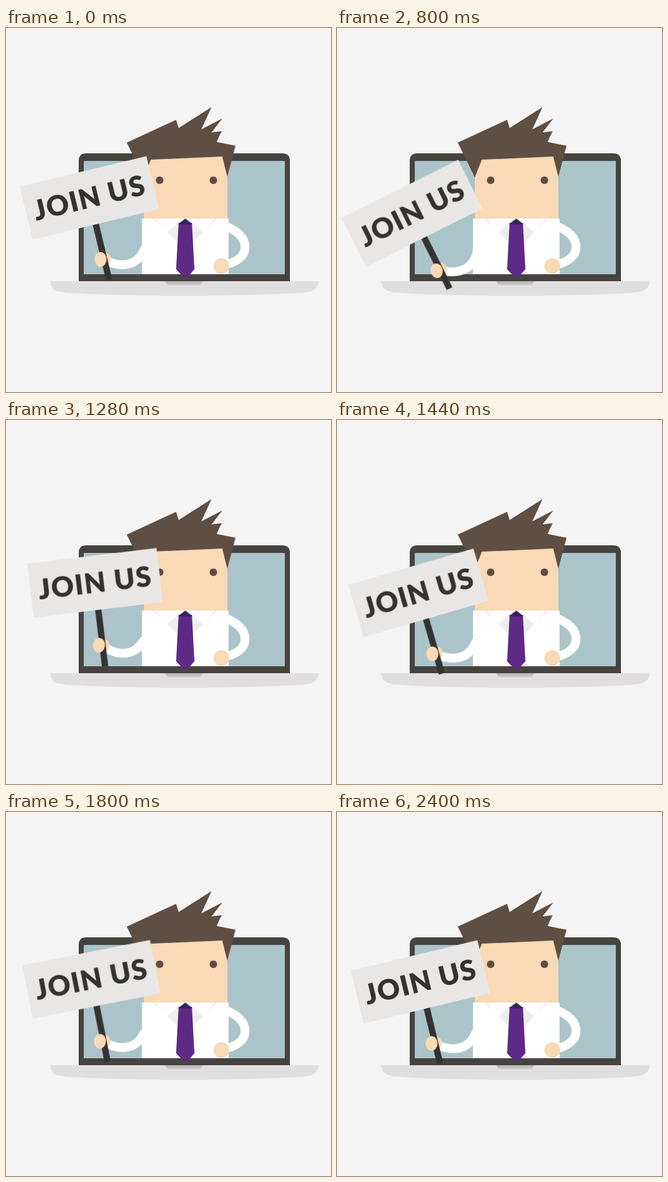
Recreate the animation shown at these times as an HTML page. Size 514 by 575 pixels, loop 3800 ms.

```html
<!DOCTYPE html>
<html lang="en">
<head>
<meta charset="utf-8">
<title>Join us</title>
<style>
  html, body { margin: 0; width: 100%; height: 100%; overflow: hidden; background: #f4f4f4; }
  svg { display: block; width: 100%; height: 100%; }

  .skin { fill: #f9d9b6; }
  .hair { fill: #5e4f42; }
  .frame { fill: #47433f; }
  .shade { fill: #eeeded; }
  .sleeve { fill: none; stroke: #fff; stroke-width: 14; }
  .label { font: 900 44px Lato, sans-serif; letter-spacing: 1.5px; text-anchor: middle; fill: #353331; }

  .arm { transform-origin: 232px 339px; animation: wave 3800ms infinite; }
  .eye { transform-box: fill-box; transform-origin: center; animation: blink 3800ms linear infinite; }

  /* Swings turn every 400 ms, starting at 400 ms. */
  @keyframes wave {
    0%      { transform: rotate(0deg); }
    10.526% { transform: rotate(0deg); animation-timing-function: cubic-bezier(.33, 0, .67, .25); }
    21.053% { transform: rotate(-13.1deg); animation-timing-function: cubic-bezier(.33, .38, .67, 1); }
    31.579% { transform: rotate(10.8deg); animation-timing-function: cubic-bezier(.33, .27, .67, .62); }
    42.105% { transform: rotate(-13.1deg); animation-timing-function: cubic-bezier(.33, .38, .67, 1); }
    52.632% { transform: rotate(10.8deg); animation-timing-function: cubic-bezier(.33, 0, .67, .65); }
    63.158%, 100% { transform: rotate(0deg); }
  }

  @keyframes blink {
    0%, 5.263%  { transform: scaleY(1); }
    8.421%      { transform: scaleY(.1); }
    11.579%, 54.079% { transform: scaleY(1); }
    56.842%     { transform: scaleY(.1); }
    60%, 100%   { transform: scaleY(1); }
  }
</style>
</head>
<body>
<svg viewBox="0 0 514 575">
  <!-- Laptop -->
  <path class="frame" d="M115 400V210Q115 198 127 198H437Q449 198 449 210V400Z"/>
  <rect x="123" y="210" width="318" height="179" fill="#abc4c9"/>
  <path fill="#e0dedf" d="M70 400H494C494 411 487 416 472 418Q390 423 282 423T92 418C77 416 70 411 70 400Z"/>
  <path fill="#bfbdbe" d="M252 400H311Q311 405.500 304 405.500H259Q252 405.500 252 400Z"/>

  <!-- Head -->
  <rect class="skin" x="218" y="195" width="132" height="106"/>
  <path class="hair" d="M191 181L269 145L273 158L325 125L309 160L342 143L325 165L341 163L333 180L363 186L350 235L342 203L229 208L218 236Z"/>
  <circle class="hair eye" cx="243" cy="240.500" r="6"/>
  <circle class="hair eye" cx="328" cy="240.500" r="6"/>

  <!-- Body -->
  <path class="sleeve" d="M344 312C370 321 378 334 378 346C378 362 362 371 343 375"/>
  <rect x="215" y="301" width="137" height="88" fill="#fff"/>
  <path class="shade" d="M233 301L270 337L283.500 301L310 323L297 337L283.500 301L334 301L297 337L283.500 305Z"/>
  <path fill="#fff" d="M236 301L255 323L280 301ZM331 301L312 323L287 301Z"/>
  <path fill="#5e2a86" d="M273 308H294L298 381L284 397L269 381Z"/>
  <path fill="#3c1f57" d="M272 310L283.500 301L295 310Z"/>
  <circle class="skin" cx="340.500" cy="376" r="12.500"/>

  <!-- Waving arm with the sign -->
  <g class="arm">
    <path class="sleeve" d="M157 367C184 380 208 375 219 350L230 339"/>
    <ellipse class="skin" cx="156" cy="365" rx="10" ry="10.500"/>
    <g transform="translate(132 268.300) rotate(-13.500)">
      <rect x="-5" y="40" width="10" height="93" fill="#353331"/>
      <rect x="-103" y="-43" width="206" height="86" fill="#e9e7e6"/>
      <text class="label" y="15.500">JOIN US</text>
    </g>
    <ellipse class="skin" cx="149.500" cy="365.500" rx="9.500" ry="11.500"/>
  </g>
</svg>
</body>
</html>
```
